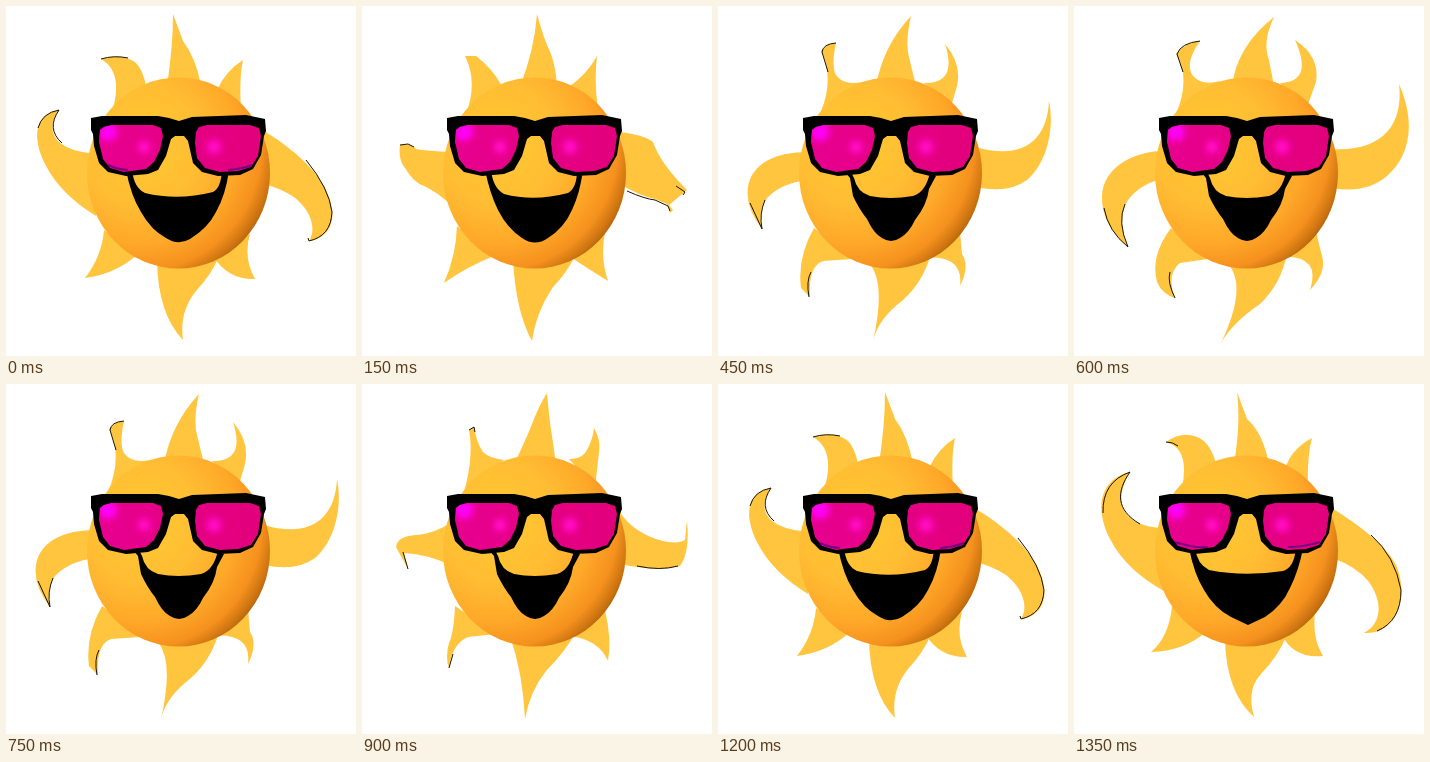
An HTML page without scripts for the animation above (1500 ms loop, 350 px wide and 350 px high).

```html
<!DOCTYPE html>
<html lang="en">
<head>
<meta charset="utf-8">
<title>Sunny</title>
<style>
  html, body { margin: 0; width: 100%; height: 100%; overflow: hidden; background: #fff; }
  svg { display: block; width: 100vw; height: 100vh; }

  /* Six poses, swung back and forth in ten equal steps */
  .pose { opacity: 0; animation: 1.5s step-end infinite; }
  .p0 { animation-name: p0; }
  .p1 { animation-name: p1; }
  .p2 { animation-name: p2; }
  .p3 { animation-name: p3; }
  .p4 { animation-name: p4; }
  .p5 { animation-name: p5; }
  @keyframes p0 { 0% { opacity: 0 } 90% { opacity: 1 } }
  @keyframes p1 { 0%, 80% { opacity: 1 } 10%, 90% { opacity: 0 } }
  @keyframes p2 { 10%, 70% { opacity: 1 } 0%, 20%, 80% { opacity: 0 } }
  @keyframes p3 { 20%, 60% { opacity: 1 } 0%, 30%, 70% { opacity: 0 } }
  @keyframes p4 { 30%, 50% { opacity: 1 } 0%, 40%, 60% { opacity: 0 } }
  @keyframes p5 { 40% { opacity: 1 } 0%, 50% { opacity: 0 } }

  .rays { fill: #ffc53e; }
  .edge { fill: none; stroke: #1c1200; stroke-linejoin: round; }
  .lash { fill: none; stroke: #7a0080; stroke-width: 2; }
</style>
</head>
<body>
<svg viewBox="0 0 350 350">
  <defs>
    <radialGradient id="ball" cx=".3" cy=".35" r=".8">
      <stop offset="0" stop-color="#ffc932"/>
      <stop offset=".4" stop-color="#ffbd33"/>
      <stop offset=".65" stop-color="#ffa829"/>
      <stop offset=".82" stop-color="#f5911e"/>
      <stop offset=".91" stop-color="#cc7310"/>
      <stop offset="1" stop-color="#8a4a05"/>
    </radialGradient>
    <linearGradient id="tint" gradientUnits="userSpaceOnUse" x1="93" x2="256" y1="0" y2="0">
      <stop offset="0" stop-color="#e8008f"/>
      <stop offset="1" stop-color="#e2007b"/>
    </linearGradient>
    <radialGradient id="glow">
      <stop offset="0" stop-color="#ff10c4"/>
      <stop offset=".35" stop-color="#fb06b2"/>
      <stop offset="1" stop-color="#e8008f" stop-opacity="0"/>
    </radialGradient>
    <radialGradient id="glint">
      <stop offset="0" stop-color="#f0f"/>
      <stop offset=".4" stop-color="#fc00e0"/>
      <stop offset="1" stop-color="#e8008f" stop-opacity="0"/>
    </radialGradient>
    <path id="lensL" d="M94 124L98 121L106 119H147L155 122L157 130L154 144L148 156L140 163L118 166L104 162L97 153L93 136Z"/>
    <path id="lensR" d="M190 126L193 121L201 119H244L253 122L255 130L252 150L245 161L232 165L214 166L199 162L191 152L189 137Z"/>
    <clipPath id="lenses"><use href="#lensL"/><use href="#lensR"/></clipPath>
  </defs>

  <g class="pose p0">
    <path class="rays" d="M160 80Q167 38 163 8L173 35Q189 49 195 80Z
      M212 82Q219 64 238 54Q233 72 234 104Z
      M92 58Q112 44 130 57Q139 66 142 80L108 104Q116 64 92 58Z
      M88 144C60 143 33 127 56 88C26 95 20 124 36 155Q52 186 90 207Z
      M258 124C286 142 311 160 322 181C336 214 322 251 290 249C308 239 309 218 295 198Q282 182 258 174Z
      M98 222Q95 253 77 268Q110 267 132 248Z
      M151 255Q152 308 180 333Q172 306 187 290Q206 270 213 250Z
      M207 250Q220 275 249 272Q238 255 241 228Z"/>
    <path class="edge" d="M92 58Q99 58 104 62M56 88Q28 98 29 129M56 88C42 108 42 126 66 140M297 151Q321 172 327 206Q327 237 303 247"/>
  </g>
  <g class="pose p1">
    <path class="rays" d="M161 80Q167 40 167 8L177 35Q190 52 195 80Z
      M212 82Q221 64 237 54Q233 72 235 104Z
      M95 53Q118 47 130 57Q137 64 140 80L106 106Q118 66 95 53Z
      M88 147C60 146 34 132 53 104C28 108 26 132 39 158Q54 188 90 210Z
      M258 125C286 142 308 162 318 180C334 210 326 232 303 235C312 220 302 202 288 191Q276 183 258 178Z
      M98 224Q96 250 79 272Q110 268 132 248Z
      M151 255Q152 308 177 334Q173 306 190 285Q206 268 213 250Z
      M207 250Q222 274 249 273Q237 252 244 228Z"/>
    <path class="edge" d="M95 53Q108 49 122 52M53 104Q40 123 56 137M53 104Q36 107 32 122M300 154Q323 182 326 206Q325 230 303 235L302 232"/>
  </g>
  <g class="pose p2">
    <path class="rays" d="M158 80Q172 46 175 8Q182 34 189 48Q194 62 195 80Z
      M208 80Q225 68 235 50Q232 76 236 104Z
      M103 50L114 50Q130 62 140 80L104 108Q116 76 103 50Z
      M90 146Q64 145 54 143Q50 137 38 139Q36 154 43 162Q52 177 62 180Q75 186 88 198Z
      M258 126Q282 129 291 136Q298 157 325 184L319 189L307 199L311 204L308 207L305 198L293 193Q278 190 258 178Z
      M95 220Q94 250 82 277Q106 260 132 250Z
      M151 255Q154 306 170 335Q174 306 191 281Q204 268 213 250Z
      M207 250Q228 264 246 275Q238 252 243 226Z"/>
    <path class="edge" d="M38 139L46 138L52 141M265 185Q283 193 293 194L306 200L308 205M314 180L323 186L321 189"/>
  </g>
  <g class="pose p3">
    <path class="rays" d="M152 80Q164 56 172 35Q178 20 185 9Q187 34 190 52L194 80Z
      M207 75Q221 76 226 64Q231 54 232 44Q239 56 237 68L233 104Z
      M112 43Q115 60 121 68Q127 74 142 76L102 108Q112 72 107 46Z
      M90 138Q72 150 54 151Q35 152 34 163L46 185L42 169Q66 170 90 182Z
      M258 128C272 152 311 164 323 156L325 136Q328 169 318 182Q296 188 258 180Z
      M93 222Q92 248 87 259Q83 274 87 284Q90 260 106 253L134 250Z
      M148 252Q161 290 163 335Q168 307 184 287Q203 268 214 248Z
      M205 252Q236 254 246 277Q250 256 243 226Z"/>
    <path class="edge" d="M107 46L112 43L113 48M41 168L46 185M275 182Q298 187 316 182M87 284L91 270"/>
  </g>
  <g class="pose p4">
    <path class="rays" d="M158 80Q165 40 193 10Q187 36 191 51L198 80Z
      M206 77Q240 78 227 38Q244 58 239 80L232 104Z
      M118 37Q113 60 118 69Q126 80 144 76L102 108Q117 72 103 45Q110 37 118 37Z
      M90 146C58 146 34 157 30 181Q27 201 44 223Q40 205 49 192Q63 177 90 174Z
      M258 141C302 154 329 137 331 95C337 124 328 158 309 174Q290 188 258 181Z
      M96 222Q79 252 83 282L92 291Q90 260 105 255L134 253Z
      M152 258Q168 278 155 335Q160 313 185 294Q205 276 213 248Z
      M205 252Q246 248 242 280Q252 260 244 248L242 226Z"/>
    <path class="edge" d="M118 37Q105 38 104 46L110 66M32 197L44 223Q41 208 47 194M91 291Q88 275 93 266"/>
  </g>
  <g class="pose p5">
    <path class="rays" d="M158 80Q163 40 200 11Q188 36 195 54L200 80Z
      M206 77Q240 76 221 34Q246 50 242 76L232 104Z
      M126 35Q110 58 119 70Q128 80 146 75L102 108Q117 72 102 48Q112 36 126 35Z
      M90 145C56 145 29 164 28 190Q27 218 54 241Q42 213 54 194Q66 178 90 172Z
      M258 143C306 146 330 121 325 78C341 114 338 148 313 170Q292 188 258 182Z
      M97 222Q76 250 83 276Q88 288 101 292Q92 268 106 257L134 253Z
      M154 258Q174 280 147 337Q158 317 186 298Q207 278 213 248Z
      M205 251Q248 248 236 284Q253 266 248 250L242 226Z"/>
    <path class="edge" d="M126 35Q107 37 103 48L109 66M30 202Q34 225 54 241Q43 216 51 198M101 292Q93 276 96 266"/>
  </g>

  <ellipse cx="172.5" cy="167" rx="91.5" ry="95.5" fill="url(#ball)"/>

  <g id="mouths">
    <path class="pose p0" d="M115 164Q120 190 130 206Q140 224 157 233L174 241L191 233Q208 222 216 204Q225 186 229 164H222Q220 184 209 187Q170 193 135 186Q123 180 121 164Z"/>
    <path class="pose p1" d="M120 164Q125 190 135 206Q145 224 160 232Q172 240 184 233Q202 222 210 206Q220 188 223 164H216Q215 182 207 186Q172 195 139 187Q128 182 126 164Z"/>
    <path class="pose p2" d="M123 164Q128 188 136 204Q145 222 160 232Q173 241 186 232Q202 222 210 204Q218 187 221 164H215Q215 182 206 187Q172 196 142 188Q131 182 129 164Z"/>
    <g class="pose p3"><path id="grin" d="M127 166L132 172L135 190Q141 203 149 213Q156 228 164 232Q173 238 182 232Q191 227 197 214Q209 199 211 183L218 170L212 166Q208 186 195 190Q172 194 152 190Q139 186 136 172L133 166Z"/></g>
    <use class="pose p4" href="#grin"/>
    <use class="pose p5" href="#grin"/>
  </g>

  <path d="M85 112L96 110H152L163 112L173 115L186 111L240 109L259 113L260 125L258 130L255 149L247 163L234 169L212 170L196 166L187 157L182 135L178 130H169L165 133L160 150L152 164L142 168L120 170L102 166L93 157L88 140L87 128L85 124Z"/>
  <g fill="url(#tint)"><use href="#lensL"/><use href="#lensR"/></g>
  <g clip-path="url(#lenses)">
    <circle cx="102" cy="126" r="16" fill="url(#glint)"/>
    <g fill="url(#glow)">
      <circle cx="138" cy="141" r="13"/>
      <circle cx="208" cy="141" r="14"/>
    </g>
    <path class="lash pose p0" d="M100 158Q108 160 116 162T134 163M214 163Q230 163 246 158"/>
    <path class="lash pose p1" d="M102 159Q110 163 122 164M222 164Q236 163 246 159"/>
  </g>
</svg>
</body>
</html>
```
